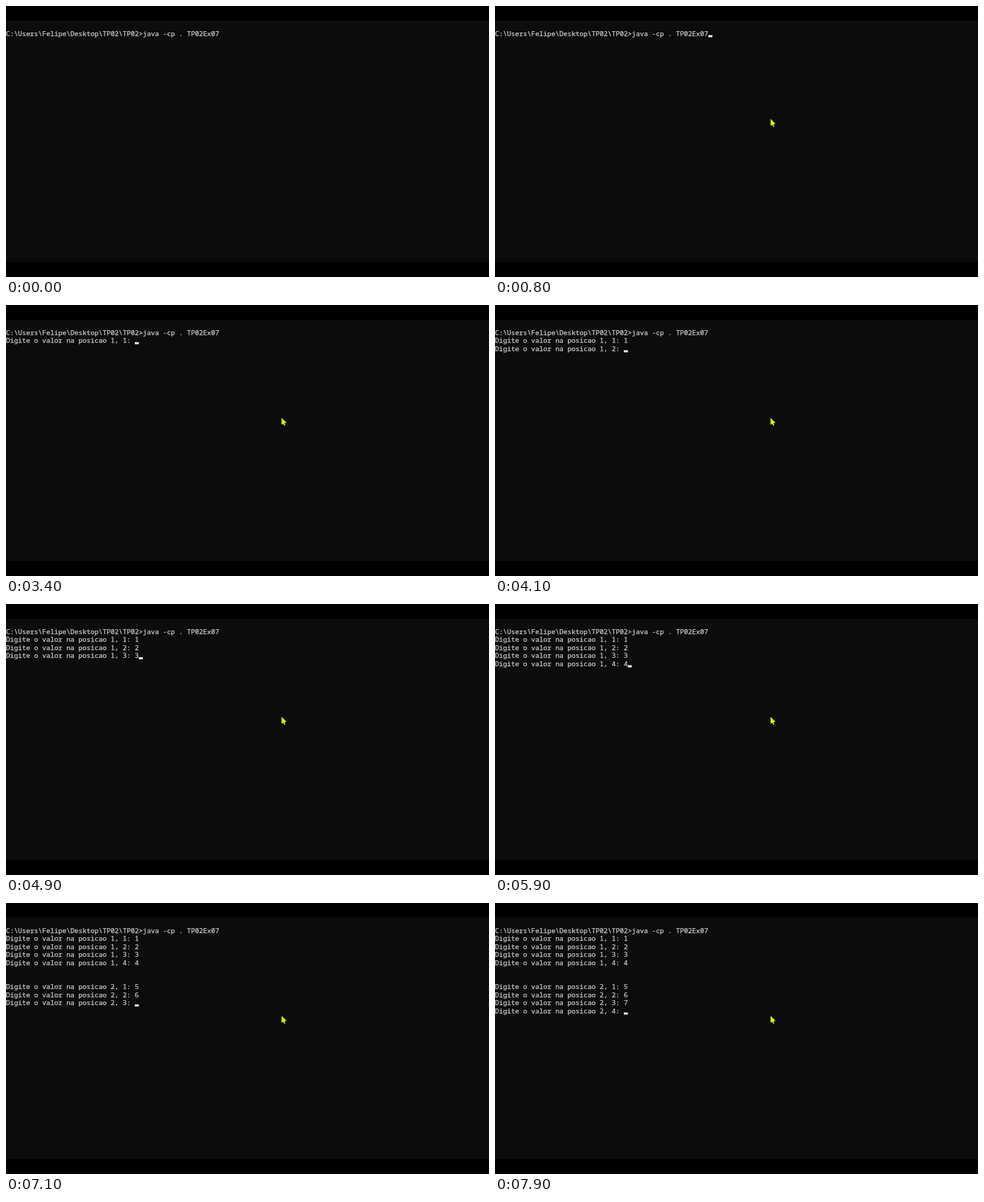
An HTML page with a canvas that plays this animation: 690 by 388 pixels, repeating every 8 s.

```html
<!DOCTYPE html>
<html lang="pt">
<head>
<meta charset="utf-8">
<title>Terminal</title>
<style>
  html, body { margin: 0; width: 100%; height: 100%; overflow: hidden; background: #000; }
  canvas { display: block; width: 690px; height: 388px; }
</style>
</head>
<body>
<canvas id="stage" width="690" height="388"></canvas>
<script>
const ctx = document.getElementById('stage').getContext('2d');
const LOOP = 8000;
const CELL_W = 5.75, CELL_H = 11.5, BASELINE = 42.7;
const COLUMNS = 4;
const COMMAND = 'C:\\Users\\Felipe\\Desktop\\TP02\\TP02>java -cp . TP02Ex07';

const RUN = 2200, FIRST_PROMPT = RUN + 100;
const digitTimes = [3700, 4400, 4900, 5900, 6500, 7000, 7500];

// Enter follows each digit, faster as the typist finds the rhythm
const enterTime = i => digitTimes[i] + Math.max(100, 400 / (i + 1));
const promptTime = i => i ? enterTime(i - 1) : FIRST_PROMPT;

const blinkOn = since => Math.floor(Math.max(0, since) / 500) % 2 === 0;

// The caret blinks while the keyboard is idle and stays lit during typing
function caretVisible(t) {
  if (t < RUN) return t >= 800 && blinkOn(t - 800);
  return t >= promptTime(1) || blinkOn(t - FIRST_PROMPT - 100);
}

function drawText(text, row) {
  const y = BASELINE + row * CELL_H;
  ctx.fillText(text, 0, y);
  ctx.strokeText(text, 0, y);
}

function drawCaret(col, row) {
  ctx.fillStyle = '#f2f2f2';
  ctx.fillRect(col * CELL_W, 41.7 + row * CELL_H, CELL_W, 3);
}

function drawPointer(t) {
  if (t < 500) return;
  const step = Math.floor(t / 100) * 100;
  const left = (1 - Math.min(1, (step - 500) / 200)) ** 2;
  ctx.save();
  ctx.translate(393.6 + 7 * left, 161.4 + 147 * left);
  ctx.fillStyle = ctx.strokeStyle = '#ccf800';
  ctx.lineWidth = 1.8;
  ctx.beginPath();
  ctx.lineTo(0, 0);
  ctx.lineTo(0, 9.8);
  ctx.lineTo(7, 7);
  ctx.fill();
  ctx.beginPath();
  ctx.moveTo(2.4, 6);
  ctx.lineTo(4.6, 11.2);
  ctx.stroke();
  ctx.restore();
}

function draw(t) {
  ctx.fillStyle = '#000';
  ctx.fillRect(0, 0, 690, 388);
  ctx.fillStyle = '#0c0c0c';
  ctx.fillRect(0, 21, 690, 345.5);

  ctx.font = `${CELL_W / 0.6}px "Noto Sans Mono", "DejaVu Sans Mono", monospace`;
  ctx.fillStyle = ctx.strokeStyle = '#ccc';
  ctx.lineWidth = 0.25;
  drawText(COMMAND, 0);

  let col = COMMAND.length, row = 0;
  if (t >= RUN) [col, row] = [0, 1];
  for (let i = 0; i <= digitTimes.length && t >= promptTime(i); i++) {
    const group = Math.floor(i / COLUMNS);
    let line = `Digite o valor na posicao ${group + 1}, ${i % COLUMNS + 1}: `;
    if (t >= digitTimes[i]) line += i + 1;
    row = 1 + i + group * 2;
    col = line.length;
    drawText(line, row);
  }

  if (caretVisible(t)) drawCaret(col, row);
  drawPointer(t);
}

const start = performance.now();
function tick() {
  draw((performance.now() - start) % LOOP);
  requestAnimationFrame(tick);
}
tick();
</script>
</body>
</html>
```
